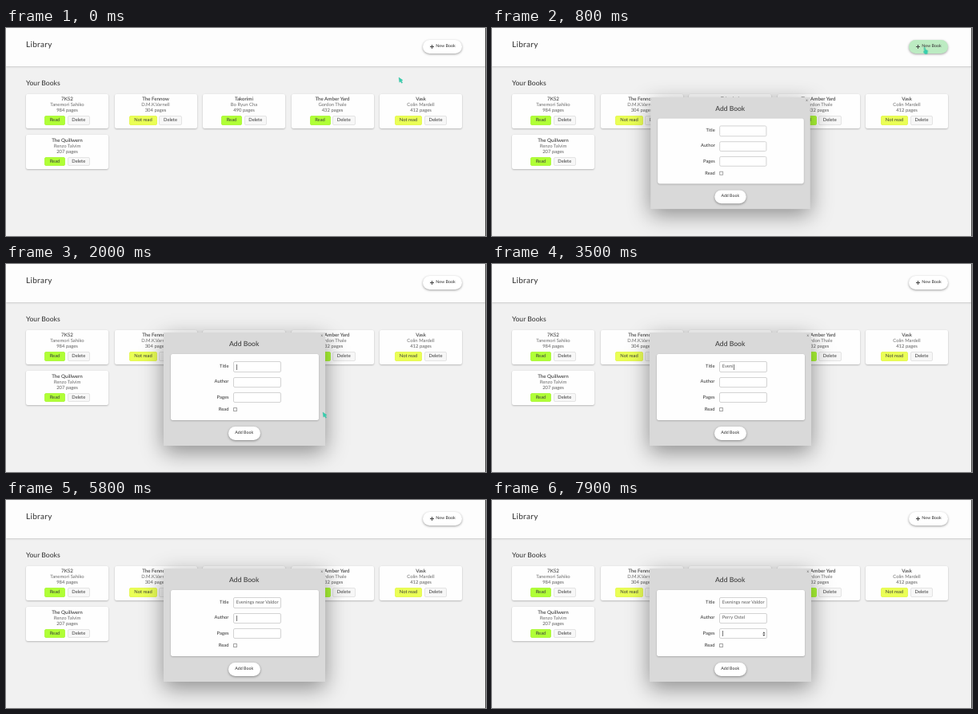
Recreate the animation shown at these times as an HTML page. Size 600 by 261 pixels, loop 8 s.

```html
<!DOCTYPE html>
<html lang="en">
<head>
<meta charset="utf-8">
<title>Library</title>
<style>
html, body { margin: 0; width: 100%; height: 100%; overflow: hidden; }
body {
  position: relative;
  background: #f1f1f1;
  color: #3e3e3e;
  font: 6px/1 Lato, sans-serif;
  text-rendering: geometricPrecision;
}
div { position: absolute; box-sizing: border-box; }
#stage { left: 0; top: 0; width: 600px; height: 261px; overflow: hidden; }
#shelf { left: 0; top: 0; }
.anim {
  animation: 8s linear infinite paused;
  animation-delay: calc(var(--t, 0) * -1ms);
}

header {
  position: absolute; left: 0; top: 0; width: 600px; height: 48px;
  background: #fdfdfd;
  box-shadow: 0 1px 2px rgba(0, 0, 0, .17);
}
h1, h2 { position: absolute; left: 25px; margin: 0; font-weight: 500; white-space: nowrap; }
h1 { top: 15.5px; font-size: 10px; letter-spacing: .03em; }
h2 { top: 65px; font-size: 8.6px; }
.edge { left: 599px; top: 0; width: 1px; height: 261px; background: #4a4a4a; }

.pill {
  display: flex; align-items: center; justify-content: center;
  height: 17px; padding-top: 1px; border-radius: 9px; background: #fff;
  box-shadow: 0 1px 3px rgba(0, 0, 0, .38);
  font-size: 5.3px; font-weight: 500; white-space: nowrap;
}
.new { left: 521px; top: 15px; width: 49px; padding-left: 8px; animation-name: hover; }
.new::before, .new::after {
  content: ""; position: absolute; left: 9px; top: 8px;
  width: 5px; height: 1px; background: #444;
}
.new::after { transform: rotate(90deg); }

.card {
  width: 103px; height: 43px; border-radius: 2px;
  background: #fefefe; box-shadow: 0 .8px 2px rgba(0, 0, 0, .28);
  text-align: center; white-space: nowrap;
}
.card > div { left: 0; width: 100%; }
.name { top: 4.5px; font-size: 6.2px; font-weight: 500; color: #383838; }
.by { top: 11.6px; color: #6c6c6c; font-size: 5.9px; }
.len { top: 18.6px; color: #5c5c5c; font-size: 5.9px; }
.row { top: 27.5px; display: flex; justify-content: center; gap: 2.5px; }
.row span {
  box-sizing: border-box; width: 28.5px; height: 11.5px; line-height: 10px;
  border: 1px solid #e4e4e4; border-radius: 2px; background: #f7f7f7;
  font-size: 5.8px; color: #3a3a3a;
}
.row .yes { width: 26px; background: #b0ff36; border-color: #b0f844; }
.row .no { width: 34.5px; background: #eaff55; border-color: #e6f858; }

.modal {
  left: 196.5px; top: 85.5px; width: 201.5px; height: 142px;
  background: #d9d9d9;
  box-shadow: 0 8px 26px rgba(0, 0, 0, .42);
  animation-name: pop;
}
.head { left: 0; top: 10px; width: 100%; text-align: center; font-size: 8.6px; font-weight: 500; }
.close { left: 196.5px; top: 1.5px; font-size: 5px; color: #666; }
.panel {
  left: 8.5px; top: 27px; width: 185px; height: 82.5px; border-radius: 2.5px;
  background: #fefefe; box-shadow: 0 .8px 2px rgba(0, 0, 0, .25);
}
.label { right: 112px; font-size: 5.8px; font-weight: 500; }
.field {
  left: 78.2px; width: 60.5px; height: 13.6px; padding-left: 3px;
  border: 1px solid #d3d3d3; border-radius: 2px; background: #fff;
  display: flex; align-items: center;
  font-size: 5.8px; color: #5c5c5c; white-space: pre;
}
.field i { display: none; width: .8px; height: 7px; background: #777; }
.field.on i { display: block; }
.spin { display: none; left: 53px; top: 3px; }
.on .spin { display: block; }
.check {
  left: 78.5px; top: 67.3px; width: 5px; height: 5px;
  border: 1px solid #a4a4a4; border-radius: .6px; background: #fff;
}
.add { left: 81px; top: 117.5px; width: 39.5px; }

.cursor { left: 0; top: 0; width: 8px; height: 11px; animation-name: travel; }
.cursor svg { position: absolute; left: 0; top: 0; overflow: visible; }
.cursor path { fill: #35cfae; stroke: #2eb296; stroke-width: .3; stroke-linejoin: round; }
.arrow { animation-name: arrow; }
.hand { animation-name: hand; }

@keyframes hover {
  0%, 4.5% { background: #fff; }
  7.5%, 12.5% { background: #bcebc2; }
  15%, 100% { background: #fff; }
}
@keyframes pop {
  0%, 7.7% { transform: scale(0); animation-timing-function: ease-in-out; }
  10.2%, 100% { transform: none; }
}
@keyframes travel {
  0%, .6% { transform: translate(491px, 62px); animation-timing-function: ease-in-out; }
  6.5% { transform: translate(539.5px, 24px); }
  12% { transform: translate(539.5px, 24px); animation-timing-function: ease-in-out; }
  21.5% { transform: translate(312px, 128px); }
  23.1% { transform: translate(312px, 128px); animation-timing-function: ease-in; }
  25% { transform: translate(396px, 186px); animation-timing-function: ease-out; }
  27.5%, 41.2% { transform: translate(475px, 238px); opacity: 1; }
  41.21%, 100% { transform: translate(475px, 238px); opacity: 0; }
}
@keyframes arrow {
  0%, 4.9% { opacity: 1; }
  4.91%, 13.7% { opacity: 0; }
  13.71%, 100% { opacity: 1; }
}
@keyframes hand {
  0%, 4.9% { opacity: 0; }
  4.91%, 13.7% { opacity: 1; }
  13.71%, 100% { opacity: 0; }
}
</style>
</head>
<body>
<div id="stage">
  <header></header>
  <h1>Library</h1>
  <div class="pill new anim">New Book</div>
  <h2>Your Books</h2>
  <div id="shelf"></div>
  <div class="modal anim">
    <div class="head">Add Book</div>
    <div class="close">x</div>
    <div class="panel" id="panel"><div class="check"></div></div>
    <div class="pill add">Add Book</div>
  </div>
  <div class="cursor anim">
    <svg class="arrow anim" width="8" height="11"><path d="M0 0 5 3.6 3.3 4.3 4.7 6.6 3.5 7.3 2.2 5 .8 6.2Z"/></svg>
    <svg class="hand anim" width="8" height="11"><path d="M.6.2Q1.6-.2 1.9.9L2.4 3.3 4.6 3.9Q5.4 4.3 5.1 5.6L4.6 8.6 1.9 8.8-.4 6Q-.5 5 .9 5.2Z"/></svg>
  </div>
  <div class="edge"></div>
</div>
<script>
const LOOP = 8000, STEP = 100;
const stage = document.getElementById('stage');
const shelf = document.getElementById('shelf');
const panel = document.getElementById('panel');

const books = [
  ['7K52', 'Tanemori Sahiko', 984, true],
  ['The Fennow', 'D.M.K.Varnell', 304, false],
  ['Takorimi', 'Bo Ryun Cha', 490, true],
  ['The Amber Yard', 'Gordon Thale', 432, true],
  ['Vask', 'Colin Mardell', 412, false],
  ['The Quillwern', 'Renzo Talvim', 207, true]
];

function add(parent, cls, html, style = {}) {
  const el = document.createElement('div');
  el.className = cls;
  el.innerHTML = html;
  Object.assign(el.style, style);
  return parent.appendChild(el);
}

books.forEach(([name, by, pages, read], i) => {
  const status = read ? '<span class="yes">Read</span>' : '<span class="no">Not read</span>';
  add(shelf, 'card',
    `<div class="name">${name}</div><div class="by">${by}</div>` +
    `<div class="len">${pages} pages</div>` +
    `<div class="row">${status}<span>Delete</span></div>`,
    { left: 25 + i % 5 * 110.5 + 'px', top: 82.5 + Math.floor(i / 5) * 51.5 + 'px' });
});

const label = (text, y) => add(panel, 'label', text, { top: y - 2.9 + 'px' });
const arrows = '<div class="spin"><svg width="4" height="6" style="display:block">' +
  '<path d="M.2 2.4 1.9.3 3.6 2.4ZM.2 3.8 1.9 5.9 3.6 3.8Z" fill="#555"/></svg></div>';

// keys: [time, characters typed]
const fields = [
  { label: 'Title', text: 'Evenings near Valdor', from: 1900, to: 5600,
    keys: [[2650, 0], [3100, 3], [3250, 3], [4150, 13], [4800, 17], [5150, 20]] },
  { label: 'Author', text: 'Perry Ostel', from: 5600, to: 7700,
    keys: [[5950, 0], [6700, 6], [7500, 11]] },
  { label: 'Pages', text: '', from: 7700, to: LOOP, keys: [[0, 0]], extra: arrows }
];

fields.forEach((f, i) => {
  const y = 16.2 + i * 19.1;
  label(f.label, y);
  f.el = add(panel, 'field', '<span></span><i></i>' + (f.extra || ''), { top: y - 6.8 + 'px' });
  f.out = f.el.firstChild;
});
label('Read', 70);

function typed(keys, t) {
  let [t0, n0] = keys[0];
  for (const [t1, n1] of keys) {
    if (t <= t1) return t1 === t0 ? n0 : Math.floor(n0 + (n1 - n0) * Math.max(0, t - t0) / (t1 - t0));
    [t0, n0] = [t1, n1];
  }
  return n0;
}

function draw(now) {
  const t = Math.floor((now + 8) % LOOP / STEP) * STEP;
  stage.style.setProperty('--t', t);
  for (const f of fields) {
    f.out.textContent = f.text.slice(0, typed(f.keys, t));
    f.el.classList.toggle('on', t >= f.from && t < f.to);
  }
}

let start;
function tick(now) {
  start ??= now;
  draw(now - start);
  requestAnimationFrame(tick);
}
draw(0);
requestAnimationFrame(tick);
</script>
</body>
</html>
```
